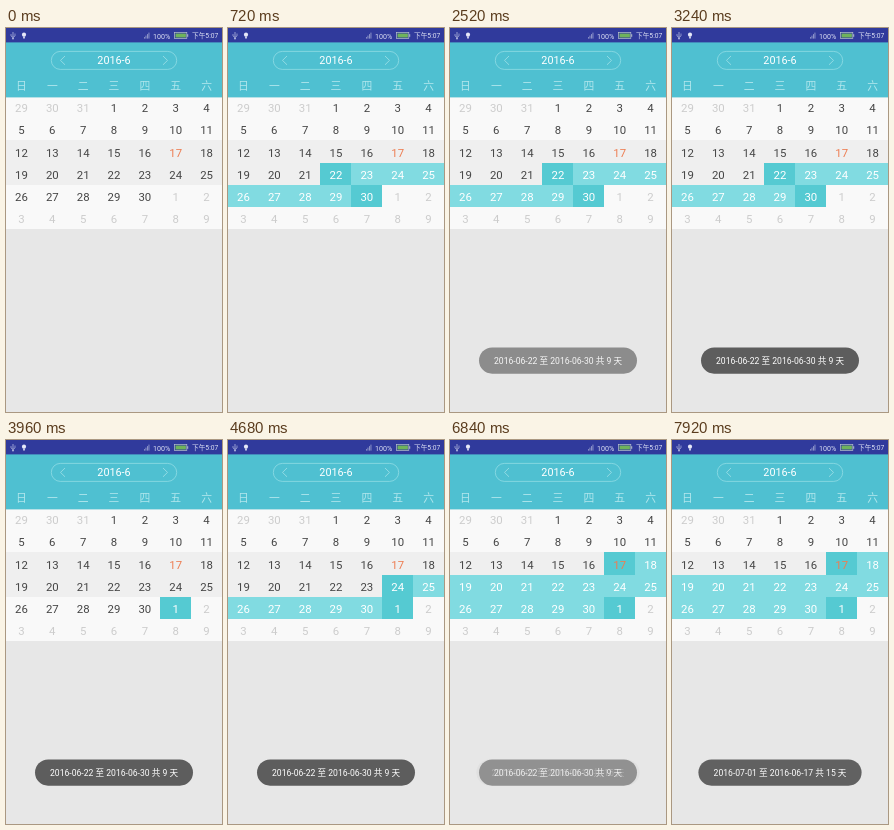
Recreate the animation shown at these times as an HTML page with a canvas. Size 216 by 384 pixels, loop 8 s.

```html
<!DOCTYPE html>
<html lang="zh">
<head>
<meta charset="utf-8">
<style>
html, body { margin: 0; width: 100%; height: 100%; overflow: hidden; background: #e7e7e7; }
canvas { display: block; width: 216px; height: 384px; }
</style>
</head>
<body>
<canvas id="stage"></canvas>
<script>
const W = 216, H = 384, LOOP = 8000, STEP = 360;
const STATUS_H = 14.4, HEADER_END = 69.6;
const COL = W / 7, TOP = 68, ROW = 22.2;
const TEAL = '#4fc0d1', PICKED = '#55cad2', RANGE = '#81dbe1', PAGE = '#e7e7e7';
const FONT = 'Roboto, "Noto Sans CJK SC", "Noto Sans CJK", sans-serif';
const FIRST_TOAST = '2016-06-22 至 2016-06-30 共 9 天';
const SECOND_TOAST = '2016-07-01 至 2016-06-17 共 15 天';

// Start time, then first and last selected cell.
const selections = [
  [0, -1, -1], [360, 24, 24], [720, 24, 32],
  [3600, 33, 33], [4680, 26, 33], [6120, 19, 33]
];
const TODAY = 19;

const canvas = document.getElementById('stage');
const scale = window.devicePixelRatio || 1;
canvas.width = W * scale;
canvas.height = H * scale;
const ctx = canvas.getContext('2d');
ctx.scale(scale, scale);

function rect(x, y, w, h, color) {
  ctx.fillStyle = color;
  ctx.fillRect(x, y, w, h);
}

function text(str, x, y, size, color, align = 'center') {
  ctx.font = `${size}px ${FONT}`;
  ctx.textAlign = align;
  ctx.textBaseline = 'alphabetic';
  ctx.fillStyle = color;
  ctx.fillText(str, x, y);
}

function line(points, color, width) {
  ctx.beginPath();
  points.forEach(([x, y]) => ctx.lineTo(x, y));
  ctx.strokeStyle = color;
  ctx.lineWidth = width;
  ctx.stroke();
}

function dot(x, y, r, color) {
  ctx.beginPath();
  ctx.arc(x, y, r, 0, Math.PI * 2);
  ctx.fillStyle = color;
  ctx.fill();
}

function statusBar() {
  rect(0, 0, W, STATUS_H, '#303a9c');
  const pale = '#b4b9e0';
  line([[7, 4], [7, 11]], pale, 0.8);
  line([[5, 6], [5, 8], [7, 9.5], [9, 8], [9, 5.5]], pale, 0.7);
  dot(7, 10.6, 0.9, pale);
  dot(18, 6.7, 2.1, '#e6e8f8');
  rect(17.2, 8.5, 1.6, 2, '#e6e8f8');

  for (let i = 0; i < 4; i++) {
    const h = 1.5 + i * 1.5;
    rect(138 + i * 1.5, 10.6 - h, 0.9, h, '#969dce');
  }
  text('100%', 147, 10.6, 7.1, '#dfe2f5', 'left');
  ctx.strokeStyle = '#b8c5c8';
  ctx.lineWidth = 0.7;
  ctx.strokeRect(168.6, 4.6, 12.2, 5.8);
  rect(169.5, 5.5, 10.4, 4, '#6fb35c');
  rect(181.2, 6.2, 1, 2.6, '#b8c5c8');
  text('下午5:07', 186, 10.4, 6.7, '#dfe2f5', 'left');
}

function header() {
  rect(0, 0, W, HEADER_END, TEAL);
  ctx.beginPath();
  ctx.roundRect(45.3, 23.4, 125.4, 18, 9);
  ctx.strokeStyle = '#91dce5';
  ctx.lineWidth = 0.8;
  ctx.stroke();
  line([[59, 28], [54.5, 32.4], [59, 36.8]], '#a3e1e8', 0.8);
  line([[157, 28], [161.5, 32.4], [157, 36.8]], '#a3e1e8', 0.8);
  text('2016-6', W / 2, 36.2, 10.8, '#fff');
  [...'日一二三四五六'].forEach((day, i) => {
    text(day, (i + 0.5) * COL, 62, 10.8, '#b0e6ec');
  });
}

function dayOf(i) {
  if (i < 3) return 29 + i;
  return i < 33 ? i - 2 : i - 32;
}

const columnX = col => Math.floor(col * COL);
const rowY = row => Math.round(TOP + row * ROW);

function calendar(first, last) {
  rect(0, HEADER_END, W, rowY(6) - HEADER_END, '#f9f9f9');
  rect(0, rowY(2), W, rowY(4) - rowY(2), '#efefef');
  for (let i = 0; i < 42; i++) {
    const col = i % 7, row = Math.floor(i / 7);
    const x = columnX(col), y = rowY(row);
    const inside = i >= first && i <= last;
    const edge = i === first || i === last;
    if (inside) rect(x, y, columnX(col + 1) - x, rowY(row + 1) - y, edge ? PICKED : RANGE);

    let color = i < 3 || i > 32 ? '#cccccc' : '#454545';
    if (inside) color = '#fff';
    if (i === TODAY) color = '#ed7d52';
    text(dayOf(i), (col + 0.5) * COL, TOP + row * ROW + 16.2, 11.4, color);
  }
}

function toast(message, halfWidth, alpha) {
  if (alpha <= 0) return;
  ctx.globalAlpha = alpha;
  ctx.beginPath();
  ctx.roundRect(W / 2 - halfWidth, 319.5, halfWidth * 2, 26.2, 13.1);
  ctx.fillStyle = '#5d5d5d';
  ctx.fill();
  // Keeps the text as bright as if bubble and label faded as one layer.
  ctx.globalAlpha = 162 * alpha / (24 + 138 * alpha);
  text(message, W / 2, 335.7, 8.6, '#fff');
  ctx.globalAlpha = 1;
}

const clamp = v => Math.max(0, Math.min(1, v));
const fadeIn = (t, start) => t < start ? 0 : clamp(0.05 + (t - start) / 1180);

function draw(now) {
  const time = now % LOOP;
  const t = Math.floor(time / STEP) * STEP;
  const [, first, last] = selections.filter(s => s[0] <= time).pop();
  rect(0, 0, W, H, PAGE);
  header();
  statusBar();
  calendar(first, last);
  const fadeOut = t < 6840 ? 1 : clamp(0.6 - (t - 6840) / 900);
  toast(FIRST_TOAST, 79, fadeIn(t, 1800) * fadeOut);
  toast(SECOND_TOAST, 81.6, fadeIn(t, 6840));
}

const start = performance.now();
function frame() {
  draw(performance.now() - start);
  requestAnimationFrame(frame);
}
frame();
</script>
</body>
</html>
```
